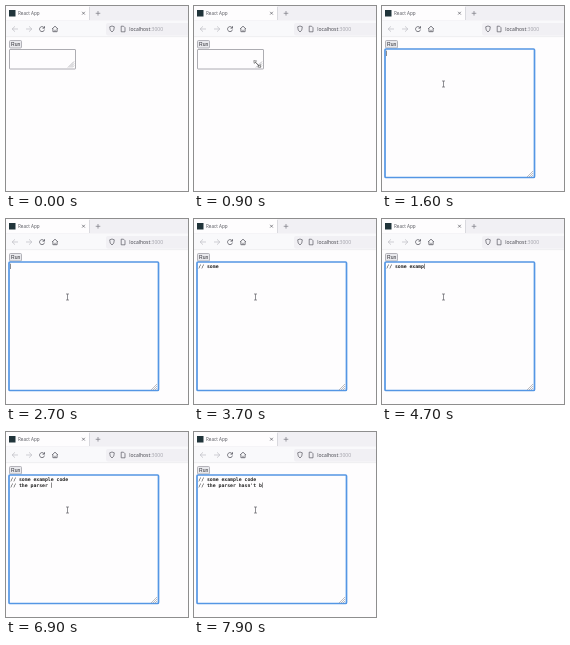
Animation, 182 px wide and 185 px high, one loop 8000 ms. Source, as an HTML page with a canvas:

```html
<!DOCTYPE html>
<html lang="en">
<head>
<meta charset="utf-8">
<title>Typing in a text area</title>
<style>
  html, body { margin: 0; width: 100%; height: 100%; overflow: hidden; background: #fefdfe; }
  canvas { display: block; width: 182px; height: 185px; }
</style>
</head>
<body>
<canvas id="stage"></canvas>
<script>
const W = 182, H = 185, LOOP = 8000, STEP = 100;
const canvas = document.getElementById('stage');
const ctx = canvas.getContext('2d');
const dpr = window.devicePixelRatio || 1;
canvas.width = W * dpr;
canvas.height = H * dpr;
ctx.scale(dpr, dpr);

const UI = '"Open Sans", "Noto Sans", sans-serif';
const SANS = '"Liberation Sans", Arial, sans-serif';
const MONO = '"DejaVu Sans Mono", monospace';
const INK = '#5a5a62', FAINT = '#bcbcc2', PAGE = '#fefdfe', BAR = '#f1f0f4';
const CHAR_W = 2.9, LINE_H = 5.8;
const CODE = "// some example code\n// the parser hasn't b";

// Typing speed is steady between these moments: [time, characters]
const PACE = [[3300, 0], [3700, 7], [4900, 15], [5500, 21], [5700, 22], [6900, 35], [7900, 43]];

const lerp = (a, b, p) => a + (b - a) * p;
const clamp = p => Math.max(0, Math.min(1, p));
const part = (t, from, to) => clamp((t - from) / (to - from));
const ease = p => p * p * (3 - 2 * p);
const progress = (t, from, to) => ease(part(t, from, to));

function typed(t) {
  let count = 0;
  for (let i = 1; i < PACE.length; i++) {
    const [t0, n0] = PACE[i - 1], [t1, n1] = PACE[i];
    if (t >= t0) count = lerp(n0, n1, part(t, t0, t1));
  }
  return Math.floor(count + 1e-6);
}

function rect(x, y, w, h, color) {
  ctx.fillStyle = color;
  ctx.fillRect(x, y, w, h);
}

function box(x, y, w, h, r, fill, stroke, width) {
  ctx.beginPath();
  ctx.roundRect(x, y, w, h, r);
  ctx.fillStyle = fill;
  ctx.fill();
  if (!stroke) return;
  ctx.strokeStyle = stroke;
  ctx.lineWidth = width;
  ctx.stroke();
}

// Draws SVG path data with its origin at (x, y)
function icon(x, y, data, color, width = 0.7, fill) {
  const shape = new Path2D(data);
  ctx.save();
  ctx.translate(x, y);
  if (fill) { ctx.fillStyle = fill; ctx.fill(shape); }
  ctx.strokeStyle = color;
  ctx.lineWidth = width;
  ctx.stroke(shape);
  ctx.restore();
}

function label(text, x, y, size, color, family = UI, weight = '') {
  ctx.font = `${weight} ${size}px ${family}`;
  ctx.fillStyle = color;
  ctx.fillText(text, x, y);
  return x + ctx.measureText(text).width;
}

function drawBrowser() {
  rect(0, 0, W, 15, BAR);
  rect(0, 0, 83, 14, '#fefdfe');
  rect(83, 1, 0.7, 13, '#cfcfd4');
  rect(3, 4, 6.5, 6.5, '#20343a');
  label('React App', 12, 9, 4.6, '#55555d');
  icon(77.5, 7.2, 'M-1.4-1.4 1.4 1.4M1.4-1.4-1.4 1.4', INK);
  icon(92, 7.3, 'M-2.3 0H2.3M0-2.3V2.3', '#77777f');

  rect(0, 14.5, W, 16, '#f9f9fb');
  rect(0, 30.5, W, 0.6, '#e6e5e9');
  icon(9, 23, 'M3 0H-3M0-2.7-2.8 0 0 2.7', FAINT);
  icon(23, 23, 'M-3 0H3M0-2.7 2.8 0 0 2.7', FAINT);
  icon(36, 23, 'M2.3-1A2.5 2.5 0 1 0 2.5.6M2.5-2.8V-.8H.5', INK, 0.8);
  icon(49, 23, 'M-3 0 0-2.8 3 0M-2.1-.4V2.7H2.1V-.4M0 .8V2.6', INK, 0.8);

  box(100, 17, 90, 12.5, 2, BAR);
  icon(106, 23, 'M0-3 2.3-2.2Q2.4 1.8 0 3-2.4 1.8-2.3-2.2Z', INK);
  icon(117, 23, 'M-1.8-2.8H.5L2-1.3V2.8H-1.8Z', INK);
  const end = label('localhost', 123.3, 25, 5, '#3c3c44');
  label(':3000', end, 25, 5, '#a0a0a8');

  box(3.5, 34.5, 12, 7.5, 1, '#e9e9ed', '#a2a2aa', 0.8);
  label('Run', 5.1, 40.2, 5, '#2a2a30', SANS);
}

function drawArea(w, h, focused) {
  const x = 3, y = 43;
  if (focused) box(x, y, w - 0.5, h - 1.5, 1, PAGE, '#5496e4', 1.7);
  else box(x + 0.5, y + 0.5, w - 1, h - 1, 0.5, PAGE, '#98989f', 0.8);
  for (const d of [2, 4, 6]) {
    icon(x + w - 2, y + h - 2, `M${-d} 0 0 ${-d}`, '#909096', 0.6);
  }
}

function drawCode(count, caret) {
  const lines = CODE.slice(0, count).split('\n');
  lines.forEach((line, i) =>
    label(line, 4.3, 49 + i * LINE_H, CHAR_W / 0.602, '#222', MONO, 'bold'));
  if (!caret) return;
  const row = lines.length - 1;
  rect(4.4 + lines[row].length * CHAR_W, 44.7 + row * LINE_H, 0.6, 5.3, '#444');
}

const CURSORS = {
  pointer: (x, y) => icon(x, y, 'M0 0V7L1.6 5.5 2.8 8 3.8 7.5 2.7 5.1 4.8 5Z', '#333', 0.6, '#fff'),
  resize: (x, y) => {
    icon(x, y, 'M-2.5-2.5 2.5 2.5', '#333', 0.8);
    icon(x, y, 'M-3.4-3.4-.6-3-3-.6ZM3.4 3.4 .6 3 3 .6Z', '#333', 0.5, '#fff');
  },
  text: (x, y) => icon(x, y, 'M0-3V3M-1.5-3H1.5M-1.5 3H1.5', '#606066')
};

function drawCursor(t, w, h) {
  if (t < STEP) return;
  if (t < 1100) {
    const p = progress(t, 0, 900);
    CURSORS[t < 800 ? 'pointer' : 'resize'](lerp(136, 63.2, p), lerp(126, 58, p));
  } else if (t < 1500) {
    CURSORS.resize(w - 3.8, h + 37.5);
  } else {
    const p = progress(t, 1400, 1600);
    CURSORS.text(lerp(149, 61.5, p), lerp(167, 78, p));
  }
}

// Blinks while idle, stays on once typing is under way
function caretOn(t) {
  if (t < 3300) return t >= 1600 && Math.floor((t - 1600) / 530) % 2 === 0;
  return t > 3700;
}

function draw(t) {
  const grow = progress(t, 1000, 1400);
  const w = lerp(67, 150, grow), h = lerp(20.5, 130, grow);
  rect(0, 0, W, H, PAGE);
  drawBrowser();
  drawArea(w, h, t >= 1600);
  drawCode(typed(t), caretOn(t));
  drawCursor(t, w, h);
}

const start = performance.now();
function tick() {
  const t = (performance.now() - start) % LOOP;
  draw(Math.floor(t / STEP) * STEP);
  requestAnimationFrame(tick);
}
tick();
</script>
</body>
</html>
```
